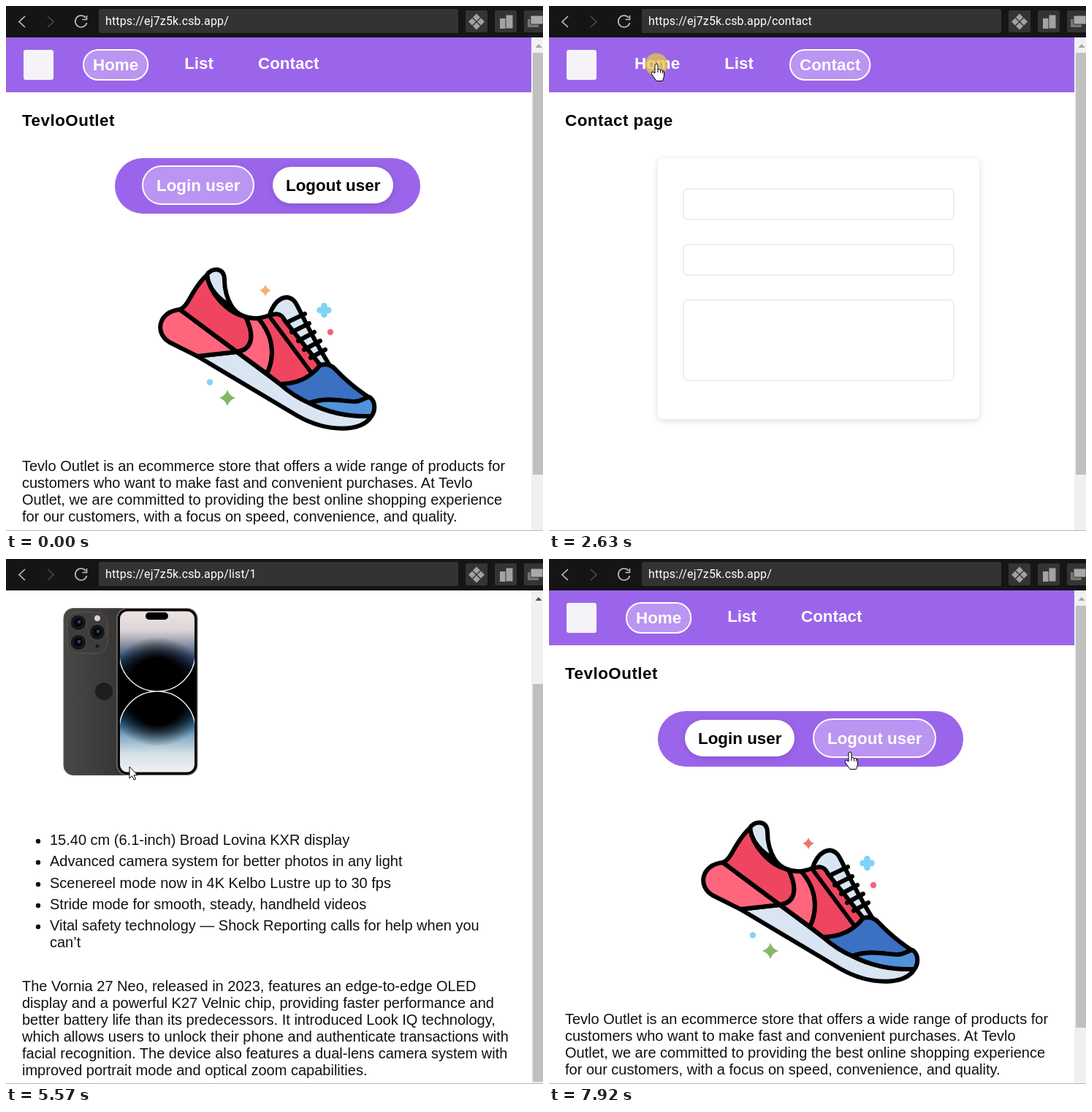
These frames come from a looping animation (735x718 px, 7990 ms). An HTML page:

```html
<!DOCTYPE html>
<html lang="en">
<head>
<meta charset="utf-8">
<title>Shop demo</title>
<style>
html, body { margin: 0; width: 100%; height: 100%; overflow: hidden; background: #fff; }
svg { display: block; width: 735px; height: 718px; }
text { font: 20px "Liberation Sans", Arial, sans-serif; fill: #111; white-space: pre; }
.bold { font-weight: bold; font-size: 22.4px; fill: #000; }
.title { letter-spacing: .5px; }
.white { fill: #fff; }
.link { fill: #00e; text-decoration: underline; }
#url { font: 16px Roboto, sans-serif; letter-spacing: .15px; fill: #fff; }
.card, .button { fill: #fff; filter: drop-shadow(0 2px 5px rgba(0,0,0,.14)); }
.pill { fill: #ba95f2; stroke: #fff; stroke-width: 2; }
.ink { stroke: #000; stroke-width: 6; stroke-linejoin: round; stroke-linecap: round; }
.tiny { font-size: 7px; fill: #ddd; }
.middle { text-anchor: middle; }
</style>
</head>
<body>
<svg id="stage" viewBox="0 0 735 718">
  <defs>
    <linearGradient id="shell"><stop stop-color="#4a4847"/><stop offset="1" stop-color="#2b2a2a"/></linearGradient>
    <linearGradient id="screen" x2="0" y2="1">
      <stop stop-color="#eee3e2"/><stop offset=".12" stop-color="#dcd5d8"/>
      <stop offset=".2" stop-color="#9298a8"/><stop offset=".29" stop-color="#33507c"/>
      <stop offset=".4" stop-color="#0a1220"/><stop offset=".47"/><stop offset=".53"/>
      <stop offset=".6" stop-color="#0b1c2c"/><stop offset=".68" stop-color="#2a6290"/>
      <stop offset=".78" stop-color="#86adc8"/><stop offset=".88" stop-color="#d3e0e6"/><stop offset="1" stop-color="#eef1f3"/>
    </linearGradient>
    <radialGradient id="shade"><stop offset=".5"/><stop offset="1" stop-opacity="0"/></radialGradient>
    <radialGradient id="glass"><stop stop-color="#d8cd98"/><stop offset=".14" stop-color="#6b6048"/><stop offset=".4" stop-color="#26333f"/><stop offset="1" stop-color="#0b0d10"/></radialGradient>
    <linearGradient id="body" x2="0" y2="1"><stop stop-color="#3a3c3e"/><stop offset=".45" stop-color="#232426"/><stop offset="1" stop-color="#141415"/></linearGradient>
    <linearGradient id="ring" x2="1" y2="1"><stop stop-color="#77797c"/><stop offset=".5" stop-color="#2b2c2e"/><stop offset="1" stop-color="#5d5f62"/></linearGradient>
    <radialGradient id="olive" cx=".4" cy=".45" r=".7"><stop stop-color="#b9a765"/><stop offset=".4" stop-color="#8a7d48"/><stop offset=".72" stop-color="#3f3d22"/><stop offset="1" stop-color="#14150e"/></radialGradient>
    <clipPath id="laptopClip"><path d="M133 590H250V670H133Z"/></clipPath>
    <clipPath id="screenClip"><rect x="156" y="208.500" width="102" height="220" rx="10"/></clipPath>
    <path id="lensText" d="M531 377A40 40 0 1 1 609 377"/>
  </defs>
</svg>
<script>
const stage = document.getElementById('stage');
const PURPLE = '#9b65eb', LOOP = 7990, SCROLL = 137;

const rect = (x, y, w, h, fill, rx = 0, more = '') =>
  `<rect x="${x}" y="${y}" width="${w}" height="${h}" rx="${rx}" fill="${fill}" ${more}/>`;
const disc = (x, y, r, fill, more = '') => `<circle cx="${x}" cy="${y}" r="${r}" fill="${fill}" ${more}/>`;
const path = (d, fill, more = '') => `<path d="${d}" fill="${fill}" ${more}/>`;
const line = (d, color, width, more = '') => path(d, 'none', `stroke="${color}" stroke-width="${width}" ${more}`);
const text = (x, y, s, cls = '', more = '') => `<text x="${x}" y="${y}" class="${cls}" ${more}>${s}</text>`;
const lines = (x, y, rows) => rows.map((s, i) => text(x, y + 23 * i, s)).join('');
const group = (id, content, more = '') => `<g id="${id}" ${more}>${content}</g>`;
const pill = (x, y, w, h) => `<rect class="pill" x="${x + 1}" y="${y + 1}" width="${w - 2}" height="${h - 2}" rx="${h / 2 - 1}"/>`;

function header(active) {
  let x = 105;
  const items = [['Home', 62.2], ['List', 39.8], ['Contact', 83.4]].map(([name, w]) => {
    const on = name === active, left = x;
    x += w + (on ? 28 : 24) + 37;
    return (on ? pill(left, 59, w + 28, 43) : '') + text(left + (on ? 14 : 12), on ? 88 : 86, name, 'bold white');
  });
  return rect(0, 43, 720, 75, PURPLE) + rect(24, 60, 41, 41, '#f6f3f8', 3) + items.join('');
}

const page = (id, active, title, content) =>
  group(id, header(active) + text(22, 164, title, 'bold title') + content);

function shoe() {
  const star = (x, y, r, fill, id = '') => {
    const k = r * .25;
    return path(`M${x} ${y - r}Q${x + k} ${y - k} ${x + r} ${y}Q${x + k} ${y + k} ${x} ${y + r}Q${x - k} ${y + k} ${x - r} ${y}Q${x - k} ${y - k} ${x} ${y - r}`, fill, id);
  };
  const part = (d, fill) => path(d, fill, 'class="ink"');
  const laces = [[384, 433, 409, 421], [391, 446, 415, 434], [400, 458, 422, 446], [408, 470, 430, 458], [417, 481, 437, 470]];
  return part('M262 479L316 473 375 517C410 546 450 559 500 561C488 583 440 584 398 560Z', '#d9e5f2') +
    part('M238 415L316 473 262 479 224 460C203 448 208 418 238 415Z', '#ff667d') +
    part('M275 368C280 358 299 356 299 374C299 390 303 401 309 411C290 401 277 385 275 368Z', '#d9e5f2') +
    part('M275 368C278 390 300 419 328 425C341 452 337 470 316 473L238 415C251 410 253 388 275 368Z', '#ef4560') +
    part('M309 411C317 423 330 428 346 427C370 455 366 485 357 503L316 473C337 470 341 452 328 425', '#ff667d') +
    part('M360 424C368 400 384 392 395 404C402 413 408 434 442 490L430 491 382 431C376 421 370 420 360 424Z', '#d9e5f2') +
    part('M345 427C362 425 374 413 382 431L430 491C418 508 398 517 375 517L357 503C366 485 370 455 345 427Z', '#ef4560') +
    line('M361 425L419 503', '#000', 5.5) +
    part('M375 517C399 517 418 507 430 491Q443 488 451 497C468 515 484 527 498 536C482 551 449 530 415 543Q394 534 375 517Z', '#3b70c2') +
    part('M415 543C440 534 462 541 477 541C488 541 490 535 498 535C507 542 505 555 500 561C469 562 442 557 415 543Z', '#5192dc') +
    laces.map(([a, b, c, d]) => line(`M${a} ${b}L${c} ${d}`, '#000', 6, 'stroke-linecap="round"')).join('') +
    star(355, 389, 8, '#f2b06f', 'id="spark"') + star(303, 536, 11, '#85b865') +
    line('M435.500 410V422M429.500 416H441.500', '#7fd3f7', 8.5, 'stroke-linecap="round"') +
    disc(444, 446, 4.2, '#f0647a') + disc(279, 514.5, 4.2, '#84d2f6');
}

const button = (x, w, label, on) => on
  ? pill(x, 218, w + 4, 54) + text(x + 20, 253, label, 'bold white')
  : `<rect class="button" x="${x}" y="220" width="${w}" height="50" rx="25"/>` + text(x + 18, 253, label, 'bold');

const home = page('home', 'Home', 'TevloOutlet',
  rect(149, 208, 418, 76, PURPLE, 38) +
  group('loginOn', button(186, 150, 'Login user', true) + button(365, 165, 'Logout user')) +
  group('logoutOn', button(186, 150, 'Login user') + button(361, 165, 'Logout user', true)) +
  shoe() +
  lines(22, 636, [
    'Tevlo Outlet is an ecommerce store that offers a wide range of products for',
    'customers who want to make fast and convenient purchases. At Tevlo',
    'Outlet, we are committed to providing the best online shopping experience',
    'for our customers, with a focus on speed, convenience, and quality.']));

function phone() {
  const lens = (x, y) => disc(x, y, 11, '#17181a', 'stroke="#555" stroke-width="1"') + disc(x, y, 6, '#07080b') + disc(x + 1, y - 1, 2.2, '#31486a');
  const shade = y => `<ellipse cx="207" cy="${y}" rx="66" ry="58" fill="url(#shade)"/>`;
  const wallpaper = rect(156, 208, 102, 221, 'url(#screen)') + shade(302) + shade(335) +
    path('M155 266A52 52 0 0 0 259 266V370A52 52 0 0 0 155 370Z', '#000') +
    line('M155 266A52 52 0 0 0 259 266M155 370A52 52 0 0 1 259 370', '#e4e7ea', 1.5);
  return rect(79, 204.5, 120, 228, 'url(#shell)', 13, 'stroke="#5a5857"') +
    rect(84, 210, 55, 56, '#3f3d3c', 15, 'stroke="#5a5856"') +
    lens(99, 224) + lens(99, 251) + lens(125, 237) + disc(125, 218, 4, '#d8d3cd') + disc(125, 256, 2.5, '#1b1b1b') +
    disc(134, 318, 12, '#1f1e1e') +
    rect(152, 204.5, 110, 228, '#050505', 14, 'stroke="#8a8a8c" stroke-width="1.2"') +
    `<g clip-path="url(#screenClip)">${wallpaper}</g>` +
    rect(191, 210, 31, 10, '#000', 5);
}

function camera() {
  return path('M462 318Q466 306 490 306L512 303H533L546 284Q550 279 558 279H584Q594 279 598 285L612 306 636 308Q647 312 647 330V412Q646 427 634 427H478Q463 427 461 412Z', 'url(#body)') +
    path('M533 309L549 284H592L609 310Q570 300 533 309Z', '#17181a') +
    rect(493, 300, 19, 10, '#4b4d50', 2) + line('M466 315Q476 309 515 310', '#66686b', 1.5) +
    path('M463 330Q480 318 504 321Q515 350 507 416Q490 428 470 422Q462 414 461 400Z', '#19191a') +
    disc(570, 368, 54, '#0b0b0c', 'stroke="url(#ring)" stroke-width="2"') +
    disc(570, 368, 48, '#1c1d1f', 'stroke="url(#ring)" stroke-width="2"') +
    disc(570, 368, 36, '#0c0d0f', 'stroke="url(#ring)" stroke-width="2.500"') +
    disc(570, 368, 29, 'url(#glass)', 'stroke="#3e4246"') +
    line('M551 356A23 23 0 0 1 577 346', '#7d8f9e', 3) + line('M580 387A22 22 0 0 0 590 376', '#4d5c69', 2) +
    disc(628, 365, 9, '#151617', 'stroke="#47494c"') +
    text(571, 295, 'Kunvo', 'middle', 'style="font:bold 12.500px Noto Serif,serif;fill:#fff"') +
    rect(620, 325, 22, 18, '#4a4b4e', 2) +
    text(631, 333, 'KXS', 'tiny middle') + text(631, 341, '1700R', 'tiny middle') +
    '<text style="font-size:5.400px;fill:#d5d5d5"><textPath href="#lensText">KUNVO ZOOM LENS KF-R 20-60mm 1:4.0-6.2</textPath></text>' +
    text(570, 412, '62mm', 'middle', 'style="font-size:5px;fill:#ccc"');
}

function laptop() {
  // Ribbons fan out of the centre; the other half is the same turned around.
  const fan = Array.from({ length: 7 }, (_, i) => {
    const x = 124 + 12 * i, y = 574 + 4 * i;
    return path(`M${x} ${y}Q${172 + 3 * i} ${602 - 3 * i} 192 630Q${160 + 3 * i} ${616 - i} ${x - 5} ${y + 12}Z`, '#0d1d24') +
      path(`M${119 + 11 * i} ${622 + 9 * i}Q${150 + 4 * i} ${612 + 5 * i} 192 630Q${164 + 4 * i} ${625 + 5 * i} ${124 + 11 * i} ${631 + 10 * i}Z`, '#16323d');
  }).join('');
  return rect(130, 587, 123, 86, '#111', 4) + rect(133, 590, 117, 80, '#b9d8e2') +
    `<g clip-path="url(#laptopClip)">${fan}<g transform="rotate(180 191.500 630)">${fan}</g></g>` +
    path('M117 670H265Q265 675 258 675H125Q118 675 117 670Z', '#b9bdc1') + rect(117, 669.5, 148, 2, '#dfe1e3') + rect(181, 670, 21, 2, '#8d9195', 1);
}

function boxPhone() {
  return rect(486.5, 549, 80, 163, '#4c524e', 8, 'stroke="#333835"') +
    [563, 582, 600].map(y => disc(500.5, y, 7.5, '#111', 'stroke="#6c716d"') + disc(500.5, y, 3, '#20272e')).join('') +
    disc(516, 563, 2, '#aaa89b') +
    rect(542.5, 549, 78, 163, '#0b0b0b', 8, 'stroke="#55594f"') + rect(545, 552, 73, 157, 'url(#olive)', 5) +
    path('M545 575Q590 568 616 640Q590 690 545 700Q582 640 545 575', '#d7c98a', 'opacity=".250"') + disc(582, 557, 1.8, '#000') +
    text(607, 705, 'Halvey E41', '', 'transform="rotate(-90 607 705)" style="font:600 23.500px Inter,sans-serif;fill:#fff"');
}

const products = [
  [22, 208, 252, 35, 241, 'Vornia 27 Neo Max'], [385, 208, 252, 397, 260, 'Kunvo 310R'],
  [22, 485, 252, 35, 518, 'Quandeo Fly'], [385, 485, 252, 397, 518, 'Zenmond E41']];
const list = page('list', 'List', 'List page',
  products.map(([x, y, h, tx, ty, name]) =>
    `<rect class="card" x="${x}" y="${y}" width="338" height="${h}"/>` + text(tx, ty, name, 'bold title link')).join('') +
  `<g transform="translate(83 152) scale(.632)">${phone()}</g>` + camera() + laptop() + boxPhone());

const contact = page('contact', 'Contact', 'Contact page',
  '<rect class="card" x="149" y="208" width="440" height="357" rx="8"/>' +
  [250, 326].map(y => rect(184, y, 370, 42, '#fff', 6, 'stroke="#ddd"')).join('') +
  rect(184, 402, 370, 110, '#fff', 6, 'stroke="#ddd"'));

const bullets = ['15.40 cm (6.1-inch) Broad Lovina KXR display', 'Advanced camera system for better photos in any light',
  'Scenereel mode now in 4K Kelbo Lustre up to 30 fps', 'Stride mode for smooth, steady, handheld videos',
  'Vital safety technology — Shock Reporting calls for help when you'];
const detail = page('detail', 'List', 'Vornia 27 Neo Max',
  phone() +
  bullets.map((s, i) => disc(44, Math.round(523 + 29.25 * i), 3.2, '#111') + text(60, Math.round(528 + 29.25 * i), s)).join('') +
  text(60, 668, 'can’t') +
  lines(22, 728, [
    'The Vornia 27 Neo, released in 2023, features an edge-to-edge OLED',
    'display and a powerful K27 Velnic chip, providing faster performance and',
    'better battery life than its predecessors. It introduced Look IQ technology,',
    'which allows users to unlock their phone and authenticate transactions with',
    'facial recognition. The device also features a dual-lens camera system with',
    'improved portrait mode and optical zoom capabilities.']));

const scrollbar = rect(719, 43, 16, 675, '#f0f0f0') + rect(721, 64, 14, 577, '#c0c0c0', 0, 'id="thumb"') +
  path('M724.500 57L729 52 733.500 57Z', '#a3a3a3', 'id="up"') + path('M724.500 701L729 706 733.500 701Z', '#505050', 'id="down"') +
  rect(0, 717, 735, 1, '#b8b8b8');

const browser = rect(0, 0, 735, 43, '#151515') + rect(127, 4, 492, 33, '#333', 2) +
  line('M26 14L18 21.500 26 29', '#c4c4c4', 1.6) + line('M57 14L65 21.500 57 29', '#4a4a4a', 1.6) +
  line('M109 16A8 8 0 1 0 110.500 23M110.500 13V18.500H104.500', '#c4c4c4', 1.6) +
  [629, 669, 709].map(x => rect(x, 6, 30, 30, '#343434', 2)).join('') +
  [[644, 15.5], [638, 21.5], [650, 21.5], [644, 27.5]].map(([x, y]) => path(`M${x} ${y - 5}l5 5-5 5-5-5Z`, '#a2a2a2')).join('') +
  rect(676, 17, 8, 14, '#a2a2a2') + rect(684, 12, 10, 19, '#a2a2a2', 0, 'stroke="#343434"') +
  rect(714, 18, 15, 11, '#777', 1) + rect(718, 13, 17, 12, '#a9a9a9', 1, 'stroke="#343434"') +
  text(136, 26, '', '', 'id="url"');

const cursor = group('cursor',
  path('M0 0V16L3.700 12.600 6.200 18 8.600 17 6.200 11.600H11Z', '#fff', 'id="arrow" stroke="#000"') +
  group('hand', path('M-2 2Q-2 0 0 0T2 2V8Q4 6.500 5.500 8.500Q8 7.500 8.500 9.800Q11 9 10.500 12V17L8.500 23.500H0L-6 15Q-8 11-5 11L-2 13Z', '#fff', 'stroke="#000" stroke-linejoin="round"') +
    line('M2 8V12M5.500 9V12.500M8.500 10V13', '#000', 1)));

stage.innerHTML += home + list + contact + detail + scrollbar + browser +
  disc(0, 0, 15.5, '#e8c84a', 'id="click" opacity=".750"') + cursor;
const $ = id => document.getElementById(id);
const show = (id, on) => $(id).setAttribute('display', on ? 'inline' : 'none');

// [time, value]: each value holds until the next time
const pages = [[0, 'home'], [1030, 'list'], [1720, 'contact'], [2700, 'home'], [3870, 'list'], [4760, 'detail'], [6540, 'home']];
const urls = [[0, ''], [1100, 'list'], [1790, 'contact'], [2770, ''], [3940, 'list'], [4830, 'list/1'], [6610, '']];
const sparks = [[0, '#f2b06f'], [2700, '#e58f72'], [6540, '#f0736a']];
const thumbs = { home: 577, list: 589, contact: 577, detail: 544 };
const clicks = [[820, 1030], [1650, 1790], [2630, 2770], [3740, 3940], [4560, 4760], [6400, 6540], [7440, 7580]];
const scrolls = [[0, 0], [5260, 0], [5570, SCROLL], [5770, SCROLL], [6060, 0], [LOOP, 0]];
// [time, x, y, shape from here on]
const moves = [
  [130, 578, 576, 'arrow'], [480, 400, 300, 'arrow'], [760, 263, 79, 'hand'], [1100, 263, 79, 'hand'],
  [1300, 305, 84, 'arrow'], [1480, 367, 81, 'hand'], [1920, 367, 81, 'hand'], [2060, 320, 84, 'arrow'],
  [2270, 250, 81, 'hand'], [2400, 210, 80, 'arrow'], [2550, 147, 79, 'hand'], [2970, 147, 79, 'hand'],
  [3120, 200, 90, 'arrow'], [3300, 280, 92, 'hand'], [3670, 258, 77, 'hand'], [3960, 258, 77, 'hand'],
  [4080, 225, 130, 'arrow'], [4400, 152, 231, 'hand'], [4760, 152, 231, 'arrow'], [5030, 152, 240, 'arrow'],
  [5200, 167, 277, 'arrow'], [5260, 167, 277, 'arrow'], [5400, 169, 284, 'arrow'], [6050, 169, 284, 'arrow'],
  [6330, 146, 79, 'hand'], [6610, 146, 79, 'hand'], [6720, 190, 125, 'arrow'], [7080, 380, 235, 'hand'],
  [7230, 434, 250, 'hand'], [7380, 416, 250, 'hand'], [7580, 416, 250, 'hand'], [7780, 412, 264, 'hand'], [LOOP, 412, 264, 'hand']];

const current = (table, t) => table.filter(([start]) => start <= t).pop();
function between(table, t, column) {
  const i = Math.max(0, table.findIndex(([end]) => end > t) - 1);
  const a = table[i], b = table[i + 1];
  const k = Math.min(1, Math.max(0, (t - a[0]) / (b[0] - a[0])));
  return a[column] + (b[column] - a[column]) * k * k * (3 - 2 * k);
}

function draw(t) {
  const name = current(pages, t)[1];
  for (const id in thumbs) show(id, id === name);
  show('loginOn', t < 7510);
  show('logoutOn', t >= 7510);
  $('spark').setAttribute('fill', current(sparks, t)[1]);
  $('url').textContent = 'https://ej7z5k.csb.app/' + current(urls, t)[1];

  const scroll = Math.round(between(scrolls, t, 1));
  $('detail').setAttribute('transform', `translate(0 ${-scroll})`);
  $('thumb').setAttribute('y', 64 + scroll * .781);
  $('thumb').setAttribute('height', thumbs[name]);
  $('up').setAttribute('fill', scroll ? '#505050' : '#a3a3a3');
  show('down', name === 'list');

  const x = Math.round(between(moves, t, 1)), y = Math.round(between(moves, t, 2));
  const shape = (current(moves, t) || moves[0])[3];
  show('cursor', t >= 130);
  show('arrow', shape === 'arrow');
  show('hand', shape === 'hand');
  $('cursor').setAttribute('transform', `translate(${x} ${y})`);
  show('click', clicks.some(([from, to]) => t >= from && t < to));
  $('click').setAttribute('transform', `translate(${x} ${y + 1})`);
}

const start = performance.now();
function tick() {
  draw((performance.now() - start) % LOOP);
  requestAnimationFrame(tick);
}
tick();
</script>
</body>
</html>
```
